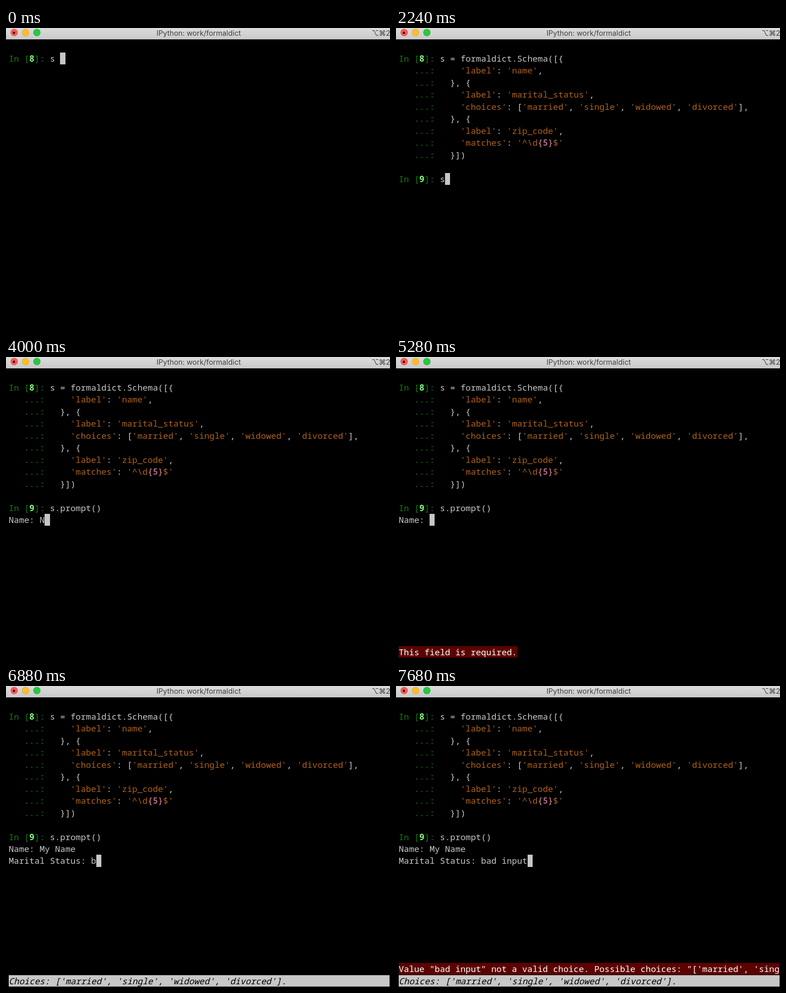
An HTML page that plays this animation: 846 by 662 pixels, repeating every 8 s.

```html
<!DOCTYPE html>
<html lang="en">
<head>
<meta charset="utf-8">
<title>Terminal</title>
<style>
  html, body { margin: 0; width: 100%; height: 100%; overflow: hidden; background: #000; }
  #stage { position: relative; width: 846px; height: 662px; overflow: hidden; background: #000; }
  #bar {
    position: absolute; inset: 0 0 auto; height: 25px;
    background: linear-gradient(#dcdcdc, #c9c9c9);
    font: 16px/22px Inter, sans-serif; color: #404040; white-space: pre;
  }
  #bar span { position: absolute; top: 0; }
  #title { left: 0; width: 849px; text-align: center; }
  #key { right: 0; font-family: Inter, "DejaVu Sans", sans-serif; letter-spacing: -.5px; }
  .light {
    position: absolute; top: 2px; width: 16px; height: 16px; border-radius: 50%;
    box-shadow: inset 0 0 0 1px rgba(0, 0, 0, .1);
  }
  .light.dot::after {
    content: ""; position: absolute; left: 5.5px; top: 5.5px; width: 5px; height: 5px;
    border-radius: 50%; background: #300;
  }
  #text, #blocks { position: absolute; left: 6px; top: 54px; }
  #text {
    margin: 0; color: #c7c7c7; white-space: pre;
    font: 18.9px/26.45px "Noto Sans Mono", monospace; font-variant-ligatures: none;
  }
  #text div { position: absolute; left: 0; }
  #blocks div { position: absolute; }
  .p { color: #137c13; }
  .n { color: #74fb74; font-weight: 700; }
  .s { color: #ae611a; }
  .x { color: #a8637f; font-weight: 700; }
  .k { color: #000; }
  .e { color: #fff; }
  .i { color: #000; font-style: italic; }
</style>
</head>
<body>
<div id="stage">
  <div id="bar">
    <div class="light dot" style="left:9.5px;background:#fc5b57"></div>
    <div class="light" style="left:34.5px;background:#fdbc2e"></div>
    <div class="light" style="left:60px;background:#28c840"></div>
    <span id="title">IPython: work/formaldict</span>
    <span id="key">⌥⌘2</span>
  </div>
  <div id="blocks"></div>
  <div id="text"></div>
</div>
<script>
const LOOP = 8000, COL = 11.34, ROW = 26.45, COLS = 74, LAST = 22;
const GREY = '#c7c7c7', RED = '#5c0300';
const CHOICES = "['married', 'single', 'widowed', 'divorced']";
const SCHEMA = `s = formaldict.Schema([{
    'label': 'name',
  }, {
    'label': 'marital_status',
    'choices': ${CHOICES},
  }, {
    'label': 'zip_code',
    'matches': '^\\d{5}$'
  }])`;

// Each step changes some fields and keeps the rest.
const steps = [
  [0, { code: 's ' }],
  [320, { code: 's =' }],
  [480, { code: 's = ' }],
  [640, { code: SCHEMA }],
  [1760, { call: '' }],
  ...typing('call', 2240, ['s', 's.', 's.p', 's.pro', 's.prom', 's.prompt', 's.prompt()']),
  [3360, { name: '' }],
  [4000, { name: 'N' }],
  [4320, { name: '' }],
  [4640, { error: 'This field is required.' }],
  [5440, { name: 'M', error: '' }],
  ...typing('name', 5600, ['My ', 'My Na', 'My Name']),
  [6080, { status: '' }],
  ...typing('status', 6880, ['b', 'bad', 'bad i', 'bad inp', 'bad input']),
  [7680, { error: `Value "bad input" not a valid choice. Possible choices: "${CHOICES}` }],
];

function typing(field, start, values) {
  return values.map((v, i) => [start + i * 160, { [field]: v }]);
}

const span = (cls, s) => `<span class="${cls}">${s}</span>`;
const paint = s => s.replace(/'[^']*'/g, q => span('s', q.replace(/\{\d\}/, m => span('x', m))));
const prompt = n => span('p', 'In [') + span('n', n) + span('p', ']: ');
const more = span('p', '   ...: ');

function draw(state) {
  const lines = [], blocks = [];
  const block = (col, row, width = 1, color = GREY) => {
    const left = Math.round(col * COL), right = Math.round((col + width) * COL);
    const top = Math.round(row * ROW), bottom = Math.round((row + 1) * ROW) - (width > 1 ? 1 : 0);
    blocks.push(`<div style="left:${left}px;top:${top}px;width:${right - left}px;` +
      `height:${bottom - top}px;background:${color}"></div>`);
  };
  const line = (row, html) =>
    lines.push(`<div style="top:${row * ROW}px">${html}</div>`);

  // While the cursor follows a closing bracket, the pair is lit.
  const cell = (source, active, number, first) => {
    const rows = source.split('\n'), end = rows.length - 1;
    const open = rows[0].indexOf('('), lit = active && source.endsWith(')');
    rows.forEach((s, i) => {
      let html = paint(s);
      if (lit && i === 0) html = html.replace('(', span('k', '('));
      if (lit && i === end) html = html.replace(/\)$/, span('k', ')'));
      line(first + i, (i ? more : prompt(number)) + html);
    });
    if (lit) {
      block(8 + open, first);
      block(7 + rows[end].length, first + end);
    }
    if (active) block(8 + rows[end].length, first + end);
  };
  const field = (label, value, row, active) => {
    line(row, label + value);
    if (active) block((label + value).length, row);
  };
  const { code, call, name, status, error } = state;
  const has = v => v !== undefined;

  cell(code, !has(call), 8, 0);
  if (has(call)) cell(call, !has(name), 9, 10);
  if (has(name)) field('Name: ', name, 11, !has(status));
  if (has(status)) {
    field('Marital Status: ', status, 12, true);
    block(0, LAST, COLS);
    line(LAST, span('i', `Choices: ${CHOICES}.`));
  }
  if (error) {
    const row = has(status) ? LAST - 1 : LAST, shown = error.slice(0, COLS);
    block(0, row, shown.length, RED);
    line(row, span('e', shown));
  }
  document.getElementById('blocks').innerHTML = blocks.join('');
  document.getElementById('text').innerHTML = lines.join('');
}

let shown = -1;
function tick() {
  const t = performance.now() % LOOP;
  const now = steps.filter(([at]) => at <= t);
  if (now.length !== shown) {
    shown = now.length;
    draw(Object.assign({}, ...now.map(([, change]) => change)));
  }
  requestAnimationFrame(tick);
}
tick();
</script>
</body>
</html>
```
